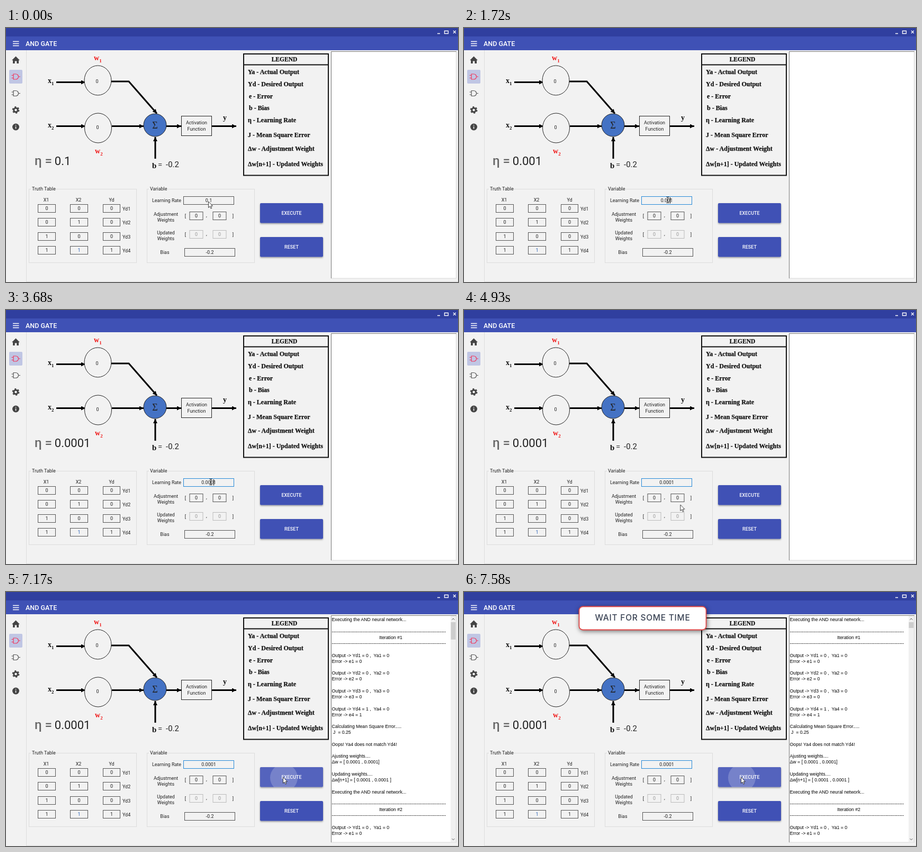
These frames come from a looping animation (854x480 px, 8000 ms). An HTML page:

```html
<!DOCTYPE html>
<html lang="en">
<head>
<meta charset="utf-8">
<title>AND gate trainer</title>
<style>
html, body { margin: 0; width: 100%; height: 100%; overflow: hidden; background: #f2f2f2; }
svg { position: absolute; left: 0; top: 0; }
text, .value { font-family: Roboto, sans-serif; font-size: 9px; fill: #222; white-space: pre; }
.mid { text-anchor: middle; }
.serif { font: bold 14px "Liberation Serif", serif; fill: #111; }
.sub { font-size: 9px; }
.red { fill: #f01818; }
.legend { font: bold 12px "Liberation Serif", serif; fill: #111; stroke: #111; stroke-width: .25px; }
.log text { font: 8.75px "Liberation Sans", sans-serif; fill: #000; }
.button { font-weight: 500; fill: #fff; }
.field { fill: #f2f2f2; stroke: #555; stroke-width: 1; }
.dim { stroke: #bbb; }
.faded { fill: #999; }
.group { fill: none; stroke: #dcdcdc; }
.wire { fill: none; stroke: #000; stroke-width: 3; }
.node { fill: #f2f2f2; stroke: #222; }
.value { position: absolute; color: #222; }
.value::after { content: "0.1"; animation: type 8s step-end infinite; }
#eta { left: 91.8px; top: 240.5px; font-size: 22px; line-height: 22px; }
#rate { left: 335px; top: 318px; width: 96px; line-height: 16px; text-align: center; }

#focus { animation: focus 8s step-end infinite; }
#caret { animation: caret 8s step-end infinite; }
#beam { animation: beamMove 8s linear infinite, beamShow 8s step-end infinite; }
#arrow { animation: arrowMove 8s linear infinite, arrowShow 8s step-end infinite; }
#hover { animation: hover 8s linear infinite; }
#ripple { transform-origin: 525px 351px; animation: ripple 8s linear infinite; }
.log { animation: log 8s step-end infinite; }
#thumb { transform-origin: 0 57px; animation: thumb 8s linear infinite; }
#notice { animation: notice 8s linear infinite; }

@keyframes type {
  0% { content: "0.1" }
  16.75% { content: "0.01" }
  21% { content: "0.001" }
  29.25% { content: "0.01" }
  32.25% { content: "0.1" }
  40.875% { content: "0.01" }
  42.625% { content: "0.001" }
  46%, 100% { content: "0.0001" }
}
@keyframes focus { 0% { opacity: 0 } 4.75%, 100% { opacity: 1 } }
@keyframes caret {
  0% { opacity: 0; transform: translateX(384px) }
  5.25% { opacity: 1; transform: translateX(384px) }
  11.625% { opacity: 0; transform: translateX(384px) }
  16.75% { opacity: 1; transform: translateX(387px) }
  21% { opacity: 1; transform: translateX(389px) }
  27.5% { opacity: 0; transform: translateX(389px) }
  29.25% { opacity: 1; transform: translateX(387px) }
  32.25% { opacity: 1; transform: translateX(384px) }
  38.75% { opacity: 0; transform: translateX(384px) }
  40.875% { opacity: 1; transform: translateX(387px) }
  42.625% { opacity: 1; transform: translateX(389px) }
  46% { opacity: 1; transform: translateX(392px) }
  51.625% { opacity: 0; transform: translateX(392px) }
  64.5% { opacity: 1; transform: translateX(392px) }
  71% { opacity: 0; transform: translateX(392px) }
  77.5% { opacity: 1; transform: translateX(392px) }
  84.875%, 100% { opacity: 0; transform: translateX(392px) }
}
@keyframes beamShow { 0% { opacity: 0 } 2.125% { opacity: 1 } 57.25%, 100% { opacity: 0 } }
@keyframes beamMove {
  0%, 2.125% { transform: translate(383px, 328px) }
  6.875%, 11.625% { transform: translate(386px, 326px) }
  13.75%, 35.25% { transform: translate(385px, 325px) }
  35.75%, 56.875% { transform: translate(387px, 325px) }
  57.25%, 100% { transform: translate(386px, 332px) }
}
@keyframes arrowShow { 0% { opacity: 1 } 2.125% { opacity: 0 } 57.25%, 100% { opacity: 1 } }
@keyframes arrowMove {
  0%, 2.125% { transform: translate(382px, 328px) }
  57.2% { transform: translate(383px, 347px) }
  58.125%, 60.4% { transform: translate(382px, 366px) }
  61.625% { transform: translate(408px, 368px) }
  64% { transform: translate(468px, 362px) }
  66% { transform: translate(508px, 353px) }
  68%, 100% { transform: translate(523px, 350px) }
}
@keyframes hover { 0%, 64.5% { opacity: 0 } 67.5%, 100% { opacity: .1 } }
@keyframes ripple { 0%, 87.5% { transform: scale(0) } 89.5%, 100% { transform: scale(1) } }
@keyframes log { 0% { opacity: 0 } 88.75%, 100% { opacity: 1 } }
@keyframes thumb {
  0%, 88.7% { transform: scaleY(60) }
  89.625% { transform: scaleY(33) }
  90.6% { transform: scaleY(23) }
  92.5% { transform: scaleY(15) }
  94.75%, 100% { transform: scaleY(11) }
}
@keyframes notice { 0%, 90.5% { opacity: 0 } 94.5%, 100% { opacity: 1 } }
</style>
</head>
<body>
<svg id="window" width="854" height="480" viewBox="0 0 854 480">
  <defs>
    <marker id="head" viewBox="0 0 8 8" refX="8" refY="4" markerWidth="8" markerHeight="8" markerUnits="userSpaceOnUse" orient="auto"><path d="M0 0 8 4 0 8z"/></marker>
    <clipPath id="executeClip"><rect x="480" y="331" width="119" height="37.5" rx="2"/></clipPath>
    <filter id="lift" x="-10%" y="-20%" width="120%" height="150%"><feDropShadow dx="0" dy="1.5" stdDeviation="1.5" flood-opacity=".4"/></filter>
  </defs>
  <rect width="854" height="480" fill="#f2f2f2"/>
  <rect width="854" height="42" fill="#3f51b5"/>
  <rect width="854" height="16" fill="#303f9f"/>
  <path d="M815 10.5h5M828.5 5.5h7v5h-7zM845 5l5 5m0-5-5 5" fill="none" stroke="#fff" stroke-width="1.3"/>
  <path d="M13 25.5h11.500M13 29.500h11.500M13 33.500h11.500" stroke="#fff" stroke-width="1.500"/>
  <text x="37" y="33.700" style="font-size:12.500px;font-weight:500;fill:#fff">AND GATE</text>

  <path d="M38.500 42V480M38 479.500H854" stroke="#dcdcdc"/>
  <path d="M11 61l7.500-7.500L26 61h-2v6h-3.700v-4.500h-3.600V67H13v-6z" fill="#444"/>
  <rect x="6" y="79" width="25" height="26" rx="2" fill="#c0c6e4"/>
  <g id="gate" fill="none" stroke="#f0365c" stroke-width="1.200"><path d="M14 87h4.500a5 5 0 0 1 0 10H14zM10.500 89.500H14M10.500 94.500H14M23.500 92H27"/></g>
  <path d="M14 118.500h4.500a5 5 0 0 1 0 10H14zM10.500 121H14M10.500 126H14M23.500 123.500H27" fill="none" stroke="#555" stroke-width="1.200"/>
  <circle cx="18.500" cy="155" r="3.800" fill="none" stroke="#444" stroke-width="3"/>
  <circle cx="18.500" cy="155" r="5.900" fill="none" stroke="#444" stroke-width="2" stroke-dasharray="3.090"/>
  <circle cx="18.500" cy="187" r="6.500" fill="#444"/>
  <path d="M18.500 183v1.600m0 1.400v4.500" stroke="#f2f2f2" stroke-width="1.500"/>

  <g class="wire" marker-end="none">
    <path d="M95 102.500H150M95 185.500H150M199 101H232L285 161M200 185.500H260M302 185.500H331M389 185.500H435M282 247V206" stroke="none"/>
    <path d="M95 102.500H150" marker-end="url(#head)"/>
    <path d="M95 185.500H150" marker-end="url(#head)"/>
    <path d="M199 101H232L285 161.500" marker-end="url(#head)"/>
    <path d="M200 185.500H260" marker-end="url(#head)"/>
    <path d="M302 185.500H331" marker-end="url(#head)"/>
    <path d="M389 185.500H435" marker-end="url(#head)"/>
    <path d="M282 247V206" marker-end="url(#head)"/>
  </g>
  <ellipse class="node" cx="173.500" cy="99" rx="25.500" ry="28"/>
  <ellipse class="node" cx="174" cy="189" rx="25.500" ry="28"/>
  <circle cx="281.500" cy="183.500" r="21.500" fill="#4472c4" stroke="#222"/>
  <rect class="node" x="331.500" y="166.500" width="57" height="37"/>
  <text class="serif" x="79" y="104">x<tspan class="sub" dy="4">1</tspan></text>
  <text class="serif" x="79" y="187.500">x<tspan class="sub" dy="4">2</tspan></text>
  <text class="serif red" x="166" y="61">w<tspan class="sub" dy="3.500">1</tspan></text>
  <text class="serif red" x="168" y="237">w<tspan class="sub" dy="3.500">2</tspan></text>
  <text class="serif" x="410" y="173.500">y</text>
  <text class="serif" x="276" y="264.500" style="font-size:15px">b</text>
  <text x="287" y="263" style="font-size:15px;fill:#444">=</text>
  <text x="302" y="263" style="font-size:15px">-0.2</text>
  <text class="mid" x="281.500" y="190" style="font:18px 'Liberation Serif',serif">Σ</text>
  <text x="54" y="259" style="font-size:24px;font-weight:500;fill:#666">η =</text>

  <rect x="449" y="49" width="160" height="229.500" fill="#f2f2f2" stroke="#111" stroke-width="2"/>
  <path d="M449 69.500H609" stroke="#111" stroke-width="2"/>
  <text class="legend mid" x="526" y="62.500" style="font-size:11.500px">LEGEND</text>

  <rect x="614.500" y="44.500" width="236" height="428.500" fill="#fff" stroke="#d8d8d8"/>
  <path d="M614.500 473V44.500H851" fill="none" stroke="#777"/>

  <rect class="group" x="43.500" y="304.500" width="203" height="139"/>
  <rect class="group" x="266.500" y="304.500" width="203" height="139"/>
  <path d="M47 304.500H93M270 304.500H306" stroke="#f2f2f2" stroke-width="3"/>

  <g filter="url(#lift)" fill="#3f51b5">
    <rect x="480" y="331" width="119" height="37.500" rx="2"/>
    <rect x="480" y="395" width="119" height="37.500" rx="2"/>
  </g>
  <g clip-path="url(#executeClip)" fill="#fff">
    <rect id="hover" x="480" y="331" width="119" height="38"/>
    <circle id="ripple" cx="525" cy="351" r="26" opacity=".2"/>
  </g>
  <text class="button mid" x="539.500" y="353">EXECUTE</text>
  <text class="button mid" x="539.500" y="416.700">RESET</text>
</svg>

<div class="value" id="eta"></div>
<div class="value" id="rate"></div>

<svg width="854" height="480" viewBox="0 0 854 480">
  <rect id="focus" x="335.500" y="318.500" width="95" height="15" fill="none" stroke="#2488d8"/>
  <rect id="caret" y="320" width="1" height="11.500"/>
  <g id="beam"><path d="M-2.500-5.500h2l.5.500.5-.500h2M0-5V5M-2.500 5.500h2L0 5l.5.500h2" fill="none" stroke="#111"/></g>
  <path id="arrow" d="M.5 0V11.500L3.100 9 5 13.200 6.800 12.400 5 8.300H8.500z" fill="#fff" stroke="#111" stroke-width=".8"/>
  <g id="notice">
    <rect x="217.500" y="27.500" width="240" height="44" rx="7" fill="#fff" stroke="#e04848" stroke-width="1.800" style="filter:drop-shadow(1px 2px 4px #0008)"/>
    <text class="mid" x="337.500" y="54" style="font:500 15.500px Inter,sans-serif;letter-spacing:.75px;fill:#3a4354">WAIT FOR SOME TIME</text>
  </g>
</svg>

<script>
const root = document.getElementById('window');
const add = markup => root.insertAdjacentHTML('beforeend', markup);
const label = (x, y, text, cls = 'mid') => `<text class="${cls}" x="${x}" y="${y + 3.2}">${text}</text>`;
const field = (x, y, w, text = '', off = false) =>
  `<rect class="field ${off ? 'dim' : ''}" x="${x + .5}" y="${y + .5}" width="${w}" height="15"/>` +
  label(x + w / 2 + .5, y + 8, text, off ? 'mid faded' : 'mid');

// Truth table
add(label(49, 304, 'Truth Table', '') + label(272, 304, 'Variable', ''));
['X1', 'X2', 'Yd'].forEach((name, col) => add(label([76, 137, 199.5][col], 325, name)));
[333, 359, 386, 412].forEach((y, row) => {
  const a = row >> 1, b = row & 1;
  add(field(60, y, 33, a) + field(121, y, 33, b) + field(183, y, 32, a & b));
  add(label(220, y + 8.5, 'Yd' + (row + 1), ''));
});
root.querySelectorAll('text.mid').forEach(t => {
  if (t.getAttribute('x') === '138' && t.getAttribute('y') > 420) t.style.fill = '#2b62b8';
});

// Variables
add(field(335, 318, 95) + field(337, 416, 95, '-0.2'));
add(label(303.5, 326, 'Learning Rate') + label(300, 424, 'Bias'));
[['Adjustment', 347, false], ['Updated', 382, true]].forEach(([name, y, off]) => {
  add(label(302, y + 4.5, name) + label(302, y + 15.5, 'Weights'));
  add(field(346.5, y, 25, 0, off) + field(390.5, y, 25, 0, off));
  add(label(339, y + 7.5, '[') + label(379, y + 7, ',') + label(429, y + 7.5, ']'));
});

// Neurons
add(label(172, 100.5, 0) + label(173, 187.5, 0));
add(label(360, 179, 'Activation') + label(360, 190.5, 'Function'));

// Legend
[[83, 'Ya - Actual Output'], [106, 'Yd - Desired Output'], [129, 'e - Error'], [151, 'b - Bias'],
 [174, 'η - Learning Rate'], [202, 'J - Mean Square Error'], [228, 'Δw - Adjustment Weight'],
 [257, 'Δw[n+1] - Updated Weights']
].forEach(([y, text]) => add(label(/^[eb]/.test(text) ? 459 : 457, y + .8, text, 'legend')));

// Training log
const dashes = '-'.repeat(74);
const heading = n => ['Executing the AND neural network...', '', dashes, `Iteration #${n}`, dashes, ''];
const result = n => [`Output -&gt; Yd${n} = ${+(n > 3)} ,  Ya${n} = 0`, `Error -&gt; e${n} = ${+(n > 3)}`, ''];
const lines = [
  ...heading(1), ...[1, 2, 3, 4].flatMap(result),
  'Calculating Mean Square Error.....', ' J  = 0.25', '', 'Oops! Ya4 does not match Yd4!', '',
  'Ajusting weights....', 'Δw = [ 0.0001 , 0.0001]', '',
  'Updating weights....', 'Δw[n+1] = [ 0.0001 , 0.0001 ]', '',
  ...heading(2), ...result(1)
];
const log = lines.map((text, i) => {
  const centred = text.startsWith('Iteration');
  return label(centred ? 727 : 615.5, 52 + i * 11.22, text, centred ? 'mid' : '');
}).join('');
add(`<g class="log">${log}
  <rect x="840" y="45" width="10" height="427.5" fill="#f0f0f0"/>
  <rect id="thumb" x="840.5" y="57" width="9" height="1" fill="#cdcdcd"/>
  <path d="M842.5 52.5l2.500-2.500 2.500 2.500M842.500 466l2.500 2.500 2.500-2.500" fill="none" stroke="#555"/>
</g>`);
</script>
</body>
</html>
```
